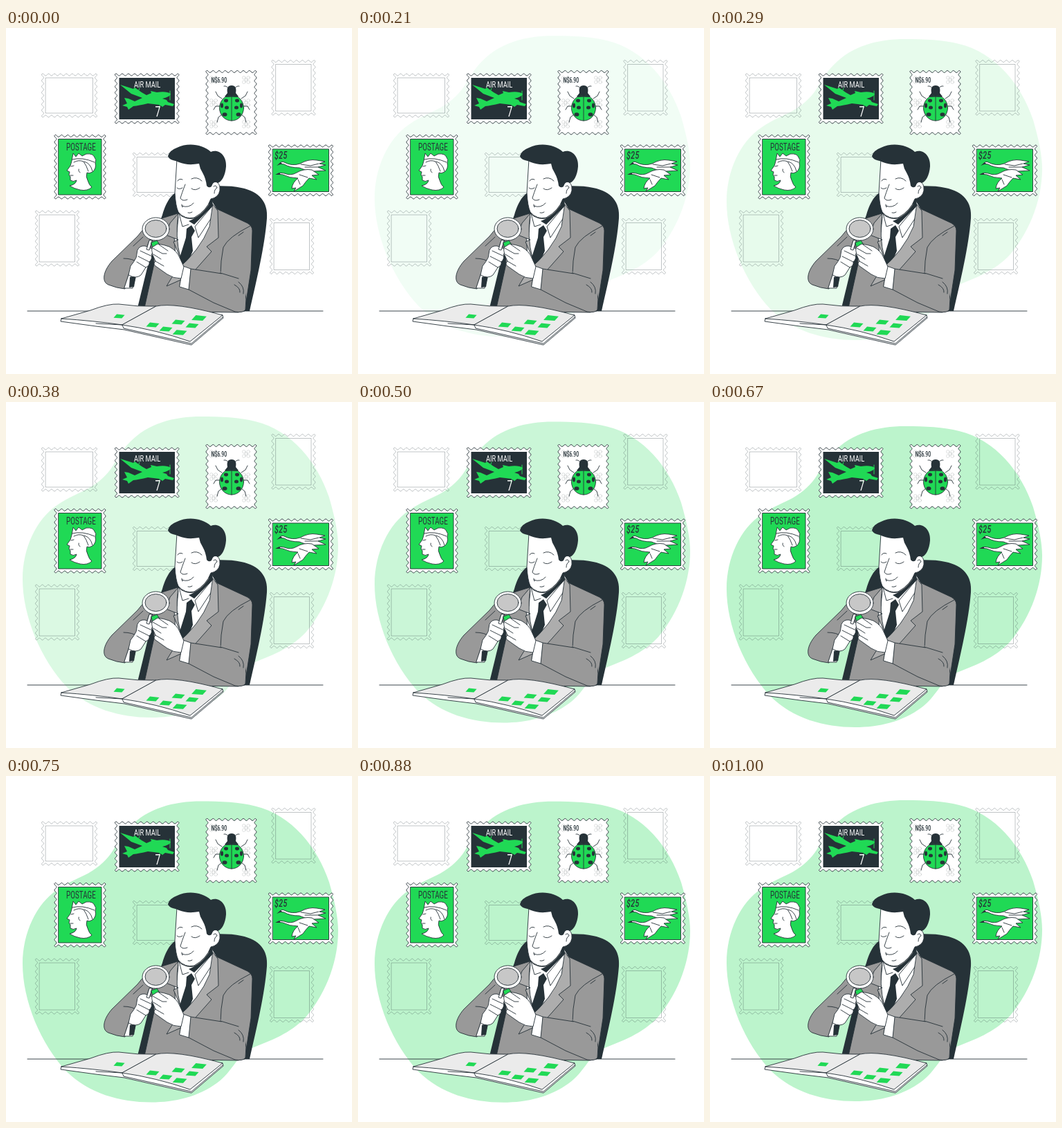
Write an HTML page that moves like this. It is 500 px wide and 500 px high and loops after 1040 ms.

```html
<!DOCTYPE html>
<html lang="en">
<head>
<meta charset="utf-8">
<title>Stamp collector</title>
<style>
html, body { margin: 0; width: 100%; height: 100%; overflow: hidden; background: #fff; }
svg { display: block; width: 100vw; height: 100vh; stroke-linejoin: round; stroke-linecap: round; }
text { font-family: Roboto, "Open Sans", sans-serif; }
.ink { fill: none; stroke: #263238; stroke-width: .9; }
.white { fill: #fff; stroke: #263238; stroke-width: .9; }
.gray { fill: #999; stroke: #263238; stroke-width: .9; }
.lapel { fill: #adadad; stroke: #263238; stroke-width: .9; }
.page { fill: #ebebeb; stroke: #263238; stroke-width: .9; }
.dark { fill: #263238; }
.green { fill: #20d955; }
.edged { fill: #20d955; stroke: #263238; stroke-width: .9; }
.faint { fill: none; stroke: #263238; stroke-opacity: .36; stroke-width: .8; }
.fainter { fill: none; stroke: #263238; stroke-opacity: .2; stroke-width: .7; }
</style>
</head>
<body>
<svg viewBox="0 0 500 500">
  <path id="blob" fill="#bcf4cc" d="M282 35C310 35 338 36 360 42C413 55 450 101 467 152C476 183 480 205 480 222C480 263 465 309 434 346C411 371 382 381 352 393C333 404 327 426 305 442C278 462 244 470 210 470C164 470 120 457 88 426C50 386 24 323 24 270C24 225 44 183 74 163C91 151 106 146 119 139C136 129 146 119 154 107C161 96 167 84 179 72C205 45 242 35 282 35Z"/>
  <g id="stamps"></g>

  <!-- air mail -->
  <path class="green" d="M165 82L184 88L186 86L196 93L203 97L210 94L209 91L218 93Q232 91 238 95Q238 99 226 102L232 104L234 107L243 110L241 113L230 111L226 114L222 111L205 109Q192 112 184 113L177 118L175 114L168 112L175 109L171 101L177 102L186 106L197 101L181 95Z"/>
  <path fill="none" stroke="#20d955" d="M237 91V104M193 87L190 95M223 109L221 117"/>

  <!-- ladybug -->
  <g id="ornaments" class="fainter"></g>
  <path class="ink" d="M312 102L306 98L303 92M309 113L303 113L300 118M312 125L307 129L305 136M340 102L346 98L349 92M343 113L349 113L352 118M340 125L345 129L347 136M322 88Q319 83 315 84M330 88Q333 83 337 84"/>
  <path class="dark" d="M320 94Q318 83 326 83Q334 83 332 94L336 99H316Z"/>
  <ellipse class="edged" cx="326" cy="115.5" rx="17.5" ry="18.5"/>
  <path class="dark" d="M316 100Q326 94 336 100Q326 99 316 100Z"/>
  <path class="ink" d="M326 98V134"/>
  <g class="dark">
    <ellipse cx="318" cy="105" rx="3" ry="2.4"/><ellipse cx="334" cy="105" rx="3" ry="2.4"/>
    <ellipse cx="312" cy="112" rx="2" ry="3.5"/><ellipse cx="340" cy="112" rx="2" ry="3.5"/>
    <ellipse cx="319" cy="115" rx="3" ry="2.5"/><ellipse cx="333" cy="115" rx="3" ry="2.5"/>
    <ellipse cx="316" cy="125" rx="3.5" ry="2.8"/><ellipse cx="336" cy="125" rx="3.5" ry="2.8"/>
  </g>

  <!-- postage -->
  <path class="white" d="M95 192L97 181L101 186L105 181L110 185L116 182Q126 181 128 187Q131 190 129 195Q131 203 125 208Q120 211 117 209Q115 215 118 220Q120 227 124 230Q118 236 107 234Q98 232 92 228Q101 226 102 220Q97 223 93 220L93 215L91 212L92 208L88 206Q91 202 93 199Z"/>
  <path class="ink" d="M96 190Q110 186 128 194M98 194Q105 190 112 193Q116 198 119 207M113 193Q122 195 125 207M94 200L98 199M93 213L97 213M105 204Q104 207 107 209"/>

  <!-- swans -->
  <path class="white" d="M395 196Q398 192 402 194Q413 200 425 196Q437 189 449 191L461 193L453 196L462 198L451 201L462 206L445 207Q434 207 424 202Q410 202 402 197Z"/>
  <path class="white" d="M392 211Q397 208 402 210Q412 214 420 209Q430 203 442 205L452 212L442 213L449 219L438 217Q433 222 429 228L416 236L419 231L413 232Q414 223 422 217Q410 217 400 212Z"/>
  <path class="dark" d="M391 199L397 194L399 196ZM389 212L395 209L397 212Z"/>
  <path class="ink" d="M426 197L440 199L452 196M432 201L451 201M424 212L436 216M422 219L425 226"/>

  <!-- table and chair -->
  <path class="ink" d="M31 409H458"/>
  <path class="dark" d="M189 409C200 365 213 305 226 270C232 250 240 235 262 231C295 228 322 227 340 231C366 236 379 252 377 275C374 315 362 365 352 409Z"/>

  <!-- torso -->
  <path class="gray" d="M248 268L222 276Q202 284 190 301L153 337C140 352 138 367 148 371Q160 376 172 377L180 349L213 328L214 341L199 409L335 411L345 409L354 350L356 293Q356 286 349 282L306 262L298 253Z"/>
  <path class="white" d="M249 268L254 272Q270 281 284 268L298 250L305 262Q299 295 264 334L246 346L243 300Z"/>
  <path class="dark" d="M298 247L299 257L272 284L264 279Q287 270 298 247ZM261 290L268 285L273 293L268 302L270 322L260 346L249 338L260 303Z"/>
  <path class="ink" d="M250 268L255 287L264 284M299 256L273 287L278 303L299 271M249 273L247 295"/>
  <path class="lapel" d="M299 255L306 264L307 303L290 316L297 323L266 358L232 373L246 350Q280 322 294 287Z"/>
  <path class="lapel" d="M249 268L237 282L231 299L249 306L242 309L252 332Q244 302 249 268Z"/>
  <path class="ink" d="M353 286Q321 302 314 317Q310 337 310 356M336 300L343 295M170 333Q183 333 191 339M198 302L184 315"/>
  <path class="gray" d="M267 348L312 355L336 362Q350 375 346 407Q343 412 331 410L300 397L264 378Z"/>
  <path fill="#999" d="M309 352L340 361L350 368L345 392L330 380Z"/>
  <path class="ink" d="M310 354L336 362M336 367Q345 374 343 384M330 371Q339 376 338 382"/>
  <path class="white" d="M256 344L267 348L264 378L251 374Z"/>

  <!-- head -->
  <path class="white" d="M247 190L244 238Q245 257 249 266Q258 277 272 274Q290 264 296 247Q307 245 309 235Q310 222 301 222L298 198Z"/>
  <path class="dark" d="M234 185Q236 177 247 173C263 165 284 168 296 179C308 174 319 185 318 200C317 213 312 222 306 224Q300 220 297 229Q293 232 290 228Q289 218 284 209Q280 203 279 196Q262 199 250 194Q246 192 241 191Q235 189 234 185Z"/>
  <path class="ink" d="M248 221Q250 217 255 219M268 218Q276 214 283 221M247 231Q250 234 255 231M268 232Q273 236 280 231M259 226Q254 239 252 246Q255 251 262 248M254 257Q264 261 271 253M254 255L255 259M263 267Q266 268 269 266M300 229Q304 226 305 231Q301 233 301 239"/>

  <!-- hands and magnifier -->
  <path class="white" d="M178 355L187 361L183 376L171 376Z"/>
  <path class="dark" d="M179 360L188 357L185 374L178 375Z"/>
  <path class="white" d="M207 307L199 330L204 332L212 308Z"/>
  <path class="white" d="M190 321Q193 314 201 315L211 319Q213 324 210 329Q212 333 207 338Q208 343 202 346L195 357Q188 363 177 357L180 344Q185 338 188 332Z"/>
  <path class="ink" d="M194 322L209 329M191 330L207 338M189 338L202 346"/>
  <path class="white" d="M207 307L203 320L207 321L211 307Z"/>
  <ellipse class="white" cx="216.5" cy="290.5" rx="19.5" ry="16.5"/>
  <ellipse cx="216.5" cy="290" rx="15.5" ry="12.5" fill="#c7c7c7" stroke="#263238" stroke-width=".9"/>
  <path class="edged" d="M210 310L218 307L222 313L212 317Z"/>
  <path class="white" d="M211 317L219 312Q228 313 236 316Q247 322 251 332L257 345L253 362Q242 362 233 356L216 344Q212 341 216 337L212 328Q210 321 211 317Z"/>
  <path class="ink" d="M212 318L226 326L232 326M213 327L224 334M216 337L228 344M221 313L234 322"/>

  <!-- album -->
  <path class="white" d="M80 420L79 424L130 431L171 436L268 458L314 419L313 415Z"/>
  <path class="page" d="M80 420L122 408Q148 398 163 399Q190 403 217 402L168 429Q126 423 80 420Z"/>
  <path class="page" d="M217 402Q244 396 313 415L266 453Q217 436 168 429Z"/>
  <path class="ink" d="M130 427L168 429L170 434L268 456L313 418"/>
  <g id="pieces" class="green"></g>
  <g id="labels"></g>
</svg>
<script>
const LOOP = 1040, FPS = 24, FRAMES = 25, FIRST_VISIBLE = 5, DROP = 30;
const $ = id => document.getElementById(id);

// Perforated edge: a cosine wave along each side, with a crest at every corner.
function perforation(x, y, w, h) {
  const amp = 1.5, points = [];
  const side = (x0, y0, dx, dy, nx, ny) => {
    const waves = Math.round(Math.hypot(dx, dy) / 8.8), steps = waves * 8;
    for (let i = 0; i <= steps; i++) {
      const t = i / steps, out = amp * Math.cos(2 * Math.PI * waves * t);
      points.push((x0 + dx * t + nx * out).toFixed(2) + " " + (y0 + dy * t + ny * out).toFixed(2));
    }
  };
  side(x, y, w, 0, 0, -1);
  side(x + w, y, 0, h, 1, 0);
  side(x + w, y + h, -w, 0, 0, 1);
  side(x, y + h, 0, -h, -1, 0);
  return "M" + points.join("L") + "Z";
}

function stamp([x, y, w, h, fill]) {
  const edge = fill ? "white" : "faint";
  const inner = fill === "white" ? "" :
    `<rect class="${fill === "green" ? "edged" : fill || "faint"}" x="${x + 4.5}" y="${y + 4.5}" width="${w - 9}" height="${h - 9}"/>`;
  return `<path class="${edge}" d="${perforation(x, y, w, h)}"/>${inner}`;
}

$("stamps").innerHTML = [
  [53, 67.5, 77, 60], [385.5, 48, 60, 76.5], [185, 182, 77, 60],
  [44, 265.5, 60, 77], [383, 277, 60, 77],
  [159, 67.5, 89.5, 69, "dark"], [290.5, 63, 70, 89.5, "white"],
  [71.5, 156, 71, 89.5, "green"], [381, 170.5, 90, 70.5, "green"]
].map(stamp).join("");

$("ornaments").innerHTML = [75, 108, 139].flatMap(y => [300, 347].map(x =>
  `<circle cx="${x}" cy="${y}" r="2"/>` +
  [-3.2, 3.2].flatMap(dx => [-3.2, 3.2].map(dy => `<circle cx="${x + dx}" cy="${y + dy}" r="2.3"/>`)).join("")
)).join("");

$("pieces").innerHTML = [
  [279, 419, 1.15], [249, 425, 1], [269, 430, 1], [212, 429, 1], [231, 435, 1], [251, 440, 1.1], [163.5, 416.5, .85]
].map(([x, y, s]) => `<path transform="translate(${x} ${y}) scale(${s})" d="M-9.5 2.5L-4-3.5L9.5-2L4.5 3.5Z"/>`).join("");

// One condensed face for all lettering.
const label = (text, x, y, size, color, style = "") =>
  `<text transform="translate(${x} ${y}) scale(.7 1)" font-size="${size}" fill="${color}" ${style}>${text}</text>`;
$("labels").innerHTML =
  label("AIR MAIL", 185, 85.5, 13.2, "#fff") +
  label("7", 215.5, 128, 20, "#fff") +
  label("N$6.90", 296.5, 79, 10, "#263238", 'font-weight="500"') +
  label("POSTAGE", 87, 177, 14, "#263238") +
  label("$25", 388, 188.5, 15, "#263238", 'font-style="italic" font-weight="500" letter-spacing=".6"');

// Progress of a CSS-style cubic-bezier curve, solved by bisection.
function bezier(x1, y1, x2, y2) {
  const at = (a, b, s) => 3 * a * s * (1 - s) ** 2 + 3 * b * s * s * (1 - s) + s ** 3;
  return x => {
    let low = 0, high = 1;
    for (let i = 0; i < 30; i++) {
      const mid = (low + high) / 2;
      if (at(x1, x2, mid) < x) low = mid; else high = mid;
    }
    return at(y1, y2, high);
  };
}
const ease = bezier(.36, -.01, .5, 1.38);

function draw(time) {
  // Steps fall at 24 per second, rounded to 10 ms.
  const clock = Math.floor((time % LOOP) / 10) * 10 + 5;
  const step = Math.min(FRAMES - 1, Math.floor(clock * FPS / 1000));
  const progress = ease((step + 1) / FRAMES);
  const blob = $("blob");
  blob.setAttribute("opacity", step < FIRST_VISIBLE ? 0 : Math.min(1, progress));
  blob.setAttribute("transform", `translate(0 ${DROP * (progress - 1)})`);
}

const start = performance.now();
function tick() {
  draw(performance.now() - start);
  requestAnimationFrame(tick);
}
tick();
</script>
</body>
</html>
```
